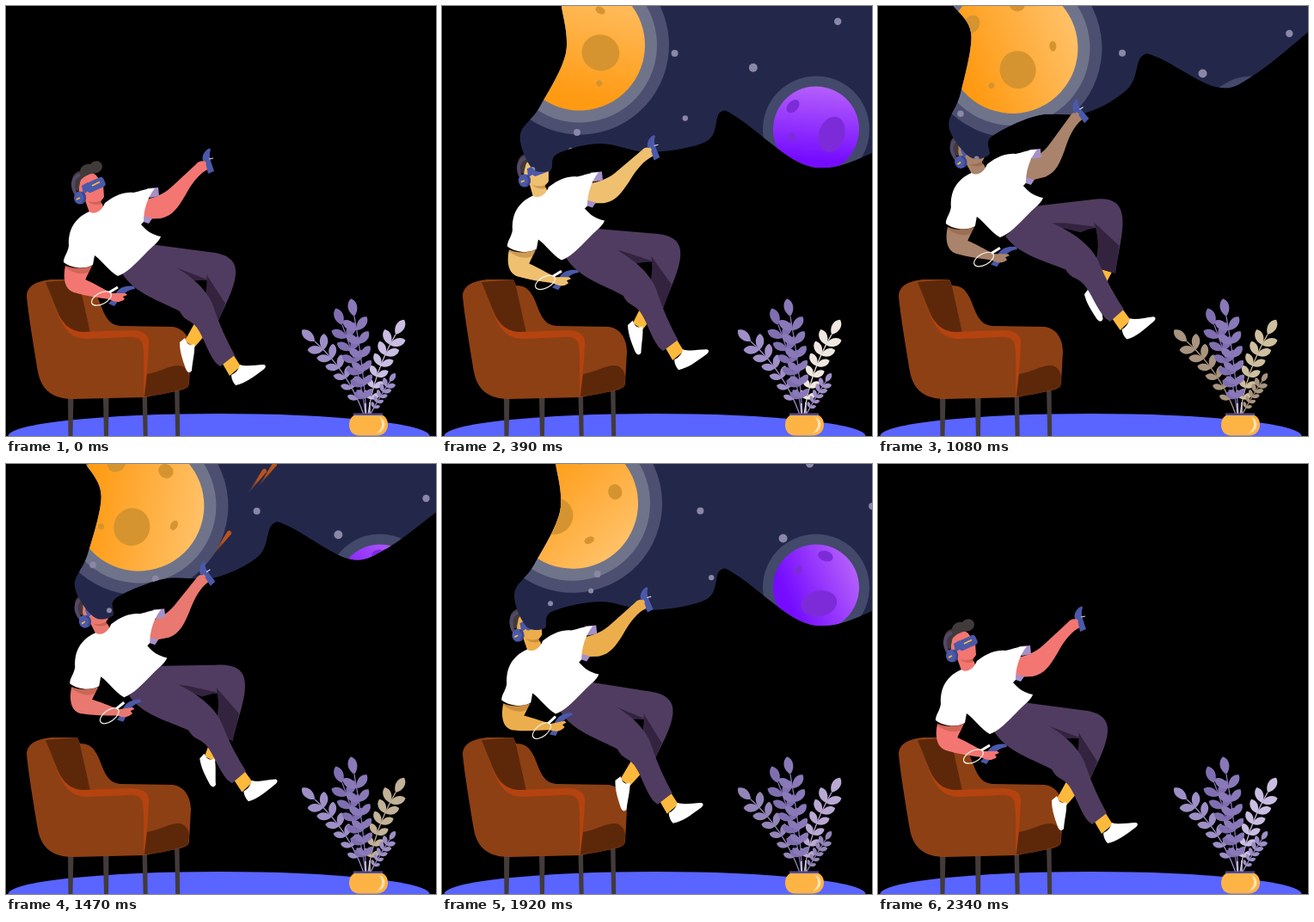
An HTML page that plays this animation: 500x500 px, repeating every 2370 ms.

```html
<!DOCTYPE html>
<html lang="en">
<head>
<meta charset="utf-8">
<title>Floating in VR</title>
<style>
html,body{margin:0;width:100%;height:100%;overflow:hidden;background:#000}
svg{display:block;width:100vw;height:100vh}
.skin{fill:var(--skin)}.dim{fill:#7a3a10;fill-opacity:.28}.lining{fill:#a591c8}
.blue{fill:#4a59a9}.pants{fill:#503c60}.shade{fill:#33233f}.gold{fill:#fdb93c}.white{fill:#fff}
</style>
</head>
<body>
<svg viewBox="0 0 500 500">
<defs>
  <linearGradient id="sunFill" x1=".42" y1="0" x2=".58" y2="1"><stop offset="0" stop-color="#ffc168"/><stop offset=".9" stop-color="#ff9a12"/></linearGradient>
  <linearGradient id="orbFill" x1=".4" y1="0" x2=".6" y2="1"><stop offset="0" stop-color="#b560fb"/><stop offset=".85" stop-color="#750cff"/></linearGradient>
  <linearGradient id="tailFill"><stop offset="0" stop-color="#b9531a" stop-opacity=".2"/><stop offset=".6" stop-color="#b9531a"/></linearGradient>
  <clipPath id="skyClip"><path id="skyEdge"/></clipPath>
</defs>

<ellipse cx="247.5" cy="500" rx="245" ry="26" fill="#5a64ff"/>

<g id="chair">
  <path fill="#423b39" d="M72,455h6.500l-1,45h-5zM113,455h6.500l-.5,45h-5zM158.500,452h5.500l.7,48h-5zM196,443h5.500l.7,57h-5z"/>
  <path fill="#8d4014" d="M24,337C25,325 35,320 52,318L83,318L86,325C97,325 102,330 107,340C113,353 116,371 133,372L194,373C208,375 215,388 215,402L213,438C213,446 205,447 161,455L78,457C55,457 41,447 37,425C33,400 26,360 24,337Z"/>
  <path fill="#5d280a" d="M46,321L83,318L86,326L98,380C78,381 66,372 61,358Z"/>
  <path fill="#5d280a" d="M164,428C180,425 190,418 200,418C208,418 212,424 213,431L212,443C195,449 180,452 161,454Z"/>
  <path fill="#b5430f" d="M46,322C58,345 60,378 90,379L145,377C160,377 167,383 166,393C165,420 162,440 160,455C160,430 161,410 159,394C157,385 150,384 140,385L95,387C62,388 60,350 46,322Z"/>
</g>

<g id="plant"></g>
<g>
  <path fill="#4e4a92" d="M404,473.500h34v4h-34z"/>
  <path fill="#fdb445" d="M405,476H438C442,478 444,482 444,487C444,494 439,499.500 431,499.500H411C403,499.500 399,494 399,487C399,482 401,478 405,476Z"/>
  <path fill="#fde2b4" d="M434,478C443,481 443,494 431,497C438,491 439,485 434,478Z"/>
</g>

<g id="headBody">
  <g id="head">
    <path class="skin" d="M84,204L97,193L104,196L113,207L114,222C112,226 108,227 112,230L115,240L107,246L97,240L92,226L85,218Z"/>
    <path class="dim" d="M95,227C102,229 108,228 113,225L112,230C106,232 99,231 95,227Z"/>
    <path fill="#413a3b" d="M77,206C76,197 81,193 86,192C87,185 94,183 98,184C102,178 112,179 112,187C111,194 104,195 99,195C94,197 86,200 86,206L84,216L79,212Z"/>
    <path d="M86,196C76,200 76,210 82,220" fill="none" stroke="#544869" stroke-width="4"/>
    <path class="blue" d="M88,209L95,205L97,214L90,219Z"/>
    <rect class="blue" x="-11.500" y="-6" width="23" height="12" rx="4" transform="translate(104 208) rotate(-25)"/>
    <path d="M100,209L109,204.500" stroke="#fdb93c" stroke-width="1.800"/>
    <ellipse class="blue" cx="86" cy="223" rx="7" ry="7.500"/>
    <path d="M88,217C93,219 93,226 89,229" fill="none" stroke="#3c468a" stroke-width="2.500"/>
    <path d="M82,225L86,223" stroke="#fdb93c" stroke-width="1.800"/>
  </g>
</g>

<g id="sky" clip-path="url(#skyClip)">
  <rect x="-50" y="-60" width="620" height="400" fill="#23284b"/>
  <g id="sun">
    <circle r="104" fill="#4c4f70"/><circle r="90" fill="#70748a"/><circle r="76" fill="url(#sunFill)"/>
  </g>
  <g id="orb"><circle r="62" fill="#43496a"/><circle r="50" fill="url(#orbFill)"/></g>
  <g id="stars" fill="#8b87a6"></g>
  <g id="meteors" fill="url(#tailFill)"></g>
</g>

<g id="body">
  <g id="backLeg">
    <path class="gold" d="M222,364L239,374L219,397L208,389Z"/>
    <path class="white" d="M202,391L208,386C210,393 214,396 219,393C220,402 217,412 216,424C213,428 210,426 208,419C205,410 202,402 202,391Z"/>
    <path class="pants" d="M160,276L236,286C258,288 268,296 267,311C266,330 252,352 243,376L222,363C229,348 235,335 234,319C215,318 196,310 172,298Z"/>
    <path class="shade" d="M233,312L255,346L243,376L222,363C229,348 235,335 233,312Z"/>
    <path class="shade" d="M176,299L200,305L234,318L215,320Z"/>
  </g>
  <g id="frontLeg">
    <path class="gold" d="M249,411L264,405L273,419L260,430Z"/>
    <path class="white" d="M262,429C267,427 271,422 272,417C280,420 290,417 300,417C303,418 302,421 299,423C288,431 278,439 267,441C264,438 262,433 262,429Z"/>
    <path class="pants" d="M135,311L173,277L178,294C206,306 235,327 242,352C248,370 256,388 266,406L249,419L244,415C234,402 230,385 222,374C213,363 209,368 202,355C180,343 150,335 135,311Z"/>
  </g>
  <g id="arm">
    <path class="skin" d="M158,226C176,223 187,216 194,209L221,184C225,179 231,179 234,184L236,189L231,192C221,199 214,210 208,221C200,234 194,244 180,247L158,248Z"/>
    <g id="grip">
      <path class="blue" d="M237,165.500C231,167 227,175 229,180L232,182L235,195L242,192L238,180C236,174 237,170 238,167Z"/>
      <path d="M236,178L241,177" stroke="#d8d8e8" stroke-width="1.200"/>
    </g>
    <path class="skin" d="M223,183L231,180L233,183L229,186L234,190L229,193Z"/>
  </g>
  <path class="lining" d="M164,212L177,211L178,221L167,223ZM159,244L170,247L166,253L160,251Z"/>
  <path class="white" d="M97,239C100,242 110,242 115,229C128,219 139,216 148,217C157,215 164,212 173,212C164,223 160,238 160,251L157,254C164,262 170,266 180,268C178,274 172,278 163,287C150,300 141,310 130,314C119,308 112,296 103,290L101,301C92,307 76,305 67,298C67,291 72,287 73,279C72,261 79,247 97,239Z"/>
  <path class="skin" d="M69,302C78,306 91,306 100,302C97,309 93,315 92,320L80,333C68,330 66,317 69,302Z"/>
  <path class="dim" d="M69,301C80,306 92,305 101,301L97,309C88,314 77,310 69,304Z"/>
  <g id="forearm">
    <path class="blue" d="M119,346L125,340C128,329 137,324 149,326L150,329C142,330 137,334 134,338L126,349Z"/>
    <path class="skin" d="M70,318L92,318C102,322 113,329 123,334L139,334L141,336L136,338L138,341C131,346 126,344 120,341C106,339 92,337 79,333C72,330 69,325 70,318Z"/>
    <ellipse cx="111" cy="340" rx="12.500" ry="6.500" transform="rotate(-28 111 340)" fill="none" stroke="#f4f1e6" stroke-width="1.200"/>
    <path d="M120,333L130,327" stroke="#fff" stroke-width="3"/>
  </g>
</g>
</svg>
<script>
const LOOP = 2370, STEP = 30, SPAN = LOOP - STEP, NS = 'http://www.w3.org/2000/svg';
const $ = id => document.getElementById(id);
const place = (id, value) => $(id).setAttribute('transform', value);
const clamp = u => Math.min(1, Math.max(0, u));
const ease = u => (u = clamp(u), u * u * (3 - 2 * u));

function add(parent, tag, attrs) {
  const el = document.createElementNS(NS, tag);
  for (const k in attrs) el.setAttribute(k, attrs[k]);
  return parent.appendChild(el);
}

// Plant: each sprig is a quadratic stem with pairs of leaves
function leaf(g, x, y, angle, len) {
  const w = len * .34, a = len * .3, b = len * .8;
  add(g, 'path', {
    d: `M0,0C${a},${-w} ${b},${-w} ${len},0C${b},${w} ${a},${w} 0,0Z`,
    transform: `translate(${x} ${y}) rotate(${angle})`
  });
}
function sprig(base, ctrl, tip, pairs, size, fill) {
  const g = add($('plant'), 'g', { style: `fill:${fill}` });
  add(g, 'path', { d: `M${base}Q${ctrl} ${tip}`, style: `fill:none;stroke:${fill};stroke-width:1.3` });
  const at = (u, i) => (1 - u) ** 2 * base[i] + 2 * u * (1 - u) * ctrl[i] + u * u * tip[i];
  const slope = (u, i) => (1 - u) * (ctrl[i] - base[i]) + u * (tip[i] - ctrl[i]);
  for (let n = 0; n <= pairs; n++) {
    const u = .18 + .82 * n / pairs;
    const dir = Math.atan2(slope(u, 1), slope(u, 0)) * 180 / Math.PI;
    for (const turn of n === pairs ? [0] : [-46, 46])
      leaf(g, at(u, 0), at(u, 1), dir + turn, size * (.55 + .45 * u));
  }
}
sprig([421, 475], [428, 425], [453, 382], 6, 20, 'var(--pale)');
sprig([416, 475], [398, 425], [359, 390], 6, 20, 'var(--leaf)');
sprig([424, 474], [434, 455], [446, 437], 5, 12, 'var(--leaf)');
sprig([418, 475], [412, 425], [391, 371], 6, 21, '#7f6fb0');
sprig([419, 475], [416, 420], [405, 361], 6, 21, '#8a79b8');
add($('plant'), 'path', { d: 'M418,474V462M423,474V461', stroke: '#d5cfe8', 'stroke-width': 1.5 });

// Craters: angle, distance, rx, ry
function craters(id, fill, ...list) {
  for (const [a, d, rx, ry] of list)
    add($(id), 'ellipse', { rx, ry, fill, transform: `rotate(${a}) translate(${d} 0)` });
}
craters('sun', '#d5942f', [0, 26, 22, 21], [-79, 47, 4, 6], [43, 50, 3.5, 3.5], [200, 51, 8, 9], [134, 55, 9, 11]);
craters('orb', '#7d2bd8', [2, 19, 15, 21], [209, 38, 6, 9], [146, 29, 4, 5.5]);

// Stars spread away from a point above the hand: x, y, r
const stars = [[263, 55, 4], [353, 68, 5], [275, 130, 3.2], [450, 10, 4.2], [151, 152, 4],
  [82, 147, 3.8], [144, 173, 3], [100, 197, 3], [382, -25, 4.5]]
  .map(([x, y, r]) => ({ x, y, el: add($('stars'), 'circle', { r }) }));

// Two meteor showers: middle time and heads
function shower(mid, ...heads) {
  const el = add($('meteors'), 'g', {});
  for (const [x, y] of heads)
    add(el, 'path', { d: 'M-35,0L-2,-2.700Q2,0 -2,2.700Z', transform: `translate(${x} ${y}) rotate(-54)` });
  return { mid, el };
}
const showers = [
  shower(810, [325, 4], [283, 51], [256, 96]),
  shower(1470, [302, 6], [261, 78], [314, -2])
];

// Joints swing by the first three harmonics of the loop
const joints = {
  arm: { pivot: '165 232', swing: [-6.5, .7, 5.2] },
  grip: { pivot: '234 186', swing: [-12, 0, 0] },
  forearm: { pivot: '80 323', swing: [-5, 6, -3] },
  backLeg: { pivot: '172 280', swing: [-9.5, -2.5, 4.3] },
  frontLeg: { pivot: '160 295', swing: [-2.7, 0, 1.7] },
  head: { pivot: '107 235', swing: [-5, 2, 5] }
};
const wave = (u, amps) => amps.reduce((sum, a, n) => sum + a * Math.sin((n + 1) * Math.PI * u), 0);

// Resting lower edge of the sky, from top left round to the right
const rest = [[135, 0], [140, 55], [110, 117], [87, 150], [100, 188], [122, 191], [130, 172], [184, 160],
  [242, 170], [308, 157], [323, 124], [344, 130], [412, 180], [455, 187], [505, 169]];

// The edge lifts more to the right, while its left side leans out
function skyPath(t, sway) {
  const lift = 1.05 * Math.sin(Math.PI * clamp((t - 390) / 1530) ** 1.15) ** 2;
  const p = rest.map(([x, y]) => {
    const dx = x < 160 ? sway - 5 - 57 * lift * Math.max(0, 1 - y / 190) : x > 300 && x < 500 ? -18 * lift : 0;
    return [x + dx, y - lift * (Math.max(0, x - 45) * .245 + Math.max(0, x - 430) * .5) * (y > 0)];
  });
  const last = p.length - 1;
  let d = `M${p[0][0] - 14},-40L${p[0]}`;
  for (let i = 0; i < last; i++) {
    const a = p[Math.max(i - 1, 0)], b = p[i], c = p[i + 1], e = p[Math.min(i + 2, last)];
    d += `C${[0, 1].map(k => b[k] + (c[k] - a[k]) / 6)} ${[0, 1].map(k => c[k] - (e[k] - b[k]) / 6)} ${c}`;
  }
  return d + 'L515,-40Z';
}

// Colours that cut from one to the next at even intervals
const cuts = {
  skin: ['#f37672', '#efc070', '#f37672', '#a9836b', '#e97870', '#ecae4c', '#f37672'],
  pale: ['#cabde2', '#f0e8e0', '#d6c8ab', '#cebf9f', '#c2b298', '#b9a9d2', '#cabde2'],
  leaf: ['#9d8fc6', '#a08fc8', '#9d8fc6', '#a8947f', '#9d8fc6', '#9385b8', '#9d8fc6']
};

function draw(t) {
  const u = t / SPAN;
  const x = wave(u, [11, 4]);
  const y = -46 * Math.max(0, Math.sin(Math.PI * u ** 1.06)) ** 1.15;
  place('body', `translate(${x} ${y})`);
  place('headBody', `translate(${x} ${y})`);
  for (const id in joints) place(id, `rotate(${wave(u, joints[id].swing)} ${joints[id].pivot})`);

  // The sky pours out of the headset and back in
  const grow = ease(t / 345) * ease((SPAN - 30 - t) / 345), hx = 105 + x, hy = 207 + y;
  $('sky').style.display = grow > 0 ? '' : 'none';
  place('sky', `translate(${hx} ${hy}) scale(${grow}) translate(${-hx} ${-hy})`);
  $('skyEdge').setAttribute('d', skyPath(t, x));

  place('sun', `translate(${162 - t * .0052} ${42 + wave(u, [7])}) rotate(${t * .0817 - 12})`);
  place('orb', `translate(435 143.5) rotate(${t * .0405})`);

  const s = t / 1000;
  for (const star of stars) {
    star.el.setAttribute('cx', star.x + s * (10 + star.x * .036));
    star.el.setAttribute('cy', star.y + s * (star.x - 265) * .11);
  }
  for (const { mid, el } of showers) {
    const dt = t - mid;
    el.style.opacity = ease(2 - Math.abs(dt) / 110);
    el.setAttribute('transform', `translate(${dt * .2} ${dt * -.28})`);
  }
  for (const name in cuts)
    document.documentElement.style.setProperty('--' + name, cuts[name][Math.round(t / 390)]);
}

const start = performance.now();
function tick() {
  const t = (performance.now() - start) % LOOP;
  draw(Math.floor(t / STEP) * STEP);
  requestAnimationFrame(tick);
}
tick();
</script>
</body>
</html>
```
